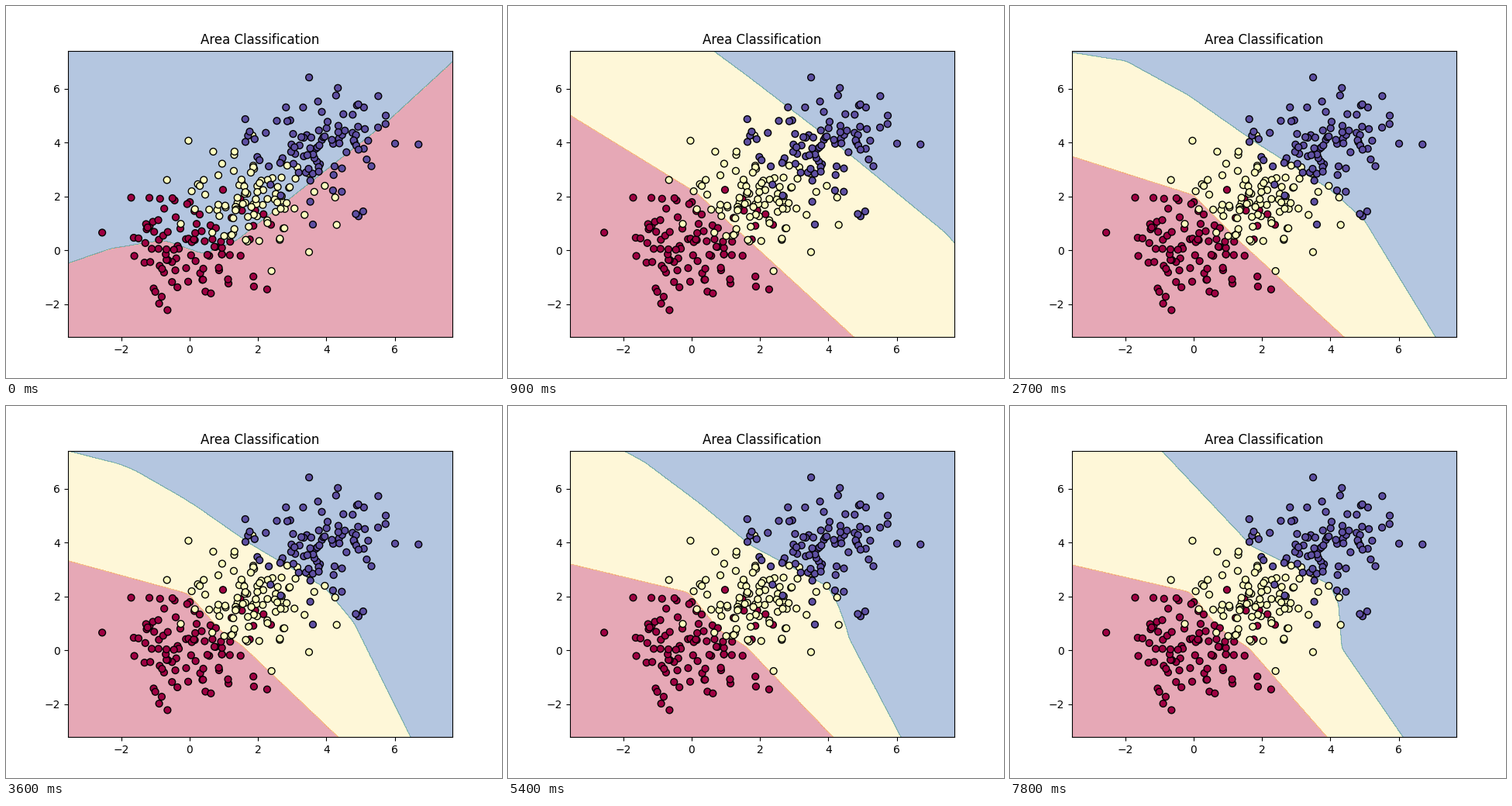
Write a matplotlib script that moves like this. It is 640 by 480 pixels and loops after 8000 ms.

```python
import numpy as np
import matplotlib.pyplot as plt
from matplotlib.animation import FuncAnimation

STEP = 0.01
TICK_MS, TICKS, TICKS_PER_EPOCH = 100, 80, 3
LEFT, RIGHT, TOP, BOTTOM = 80, 576, 57.6, 427.2
DECAY = 0.8  # share of the remaining change left after each epoch

# Three unit Gaussian clusters along the diagonal
np.random.seed(0)
labels = np.repeat([0, 1, 2], 100)
points = np.random.randn(300, 2) + 2 * labels[:, None]

(x_min, y_min), (x_max, y_max) = points.min(0) - 1, points.max(0) + 1
xs, ys = np.arange(x_min, x_max, STEP), np.arange(y_min, y_max, STEP)
stage_x, stage_y = np.meshgrid(
    np.interp(xs, (xs[0], xs[-1]), (LEFT, RIGHT)),
    np.interp(ys, (ys[0], ys[-1]), (BOTTOM, TOP)))
along, across = stage_x + stage_y, stage_x - stage_y

# Corners of the decision borders in stage pixels: (lower, upper) per key epoch
UNTRAINED = [(80, 332), (135, 313), (203, 302), (255, 320), (297, 303), (490, 151), (576, 72)]
BORDERS = {
    1: ([(80, 87), (491, 427)],
        [(429, 58), (576, 181)]),
    5: ([(80, 169), (237, 248), (420, 427)],
        [(148, 58), (265, 138), (400, 236), (520, 333), (576, 402)]),
    9: ([(80, 194), (237, 244), (290, 298), (431, 427)],
        [(80, 60), (150, 71), (230, 115), (320, 178), (412, 236), (457, 276), (549, 427)]),
    16: ([(80, 203), (234, 241), (275, 291), (305, 308), (427, 427)],
         [(85, 58), (165, 84), (245, 131), (314, 179), (412, 234), (443, 279), (507, 427)]),
    26: ([(80, 205), (232, 240), (270, 287), (308, 312), (409, 427)],
         [(196, 58), (312, 181), (412, 230), (424, 255), (428, 312), (507, 427)]),
}
KEYS = list(BORDERS)
SAMPLES = np.arange(0, 1150, 2)
KERNEL = np.hanning(15) / np.hanning(15).sum()


def smooth_curve(corners):
    """Line through the corners, extended at both ends and slightly rounded."""
    p = np.array(corners, float)
    p = np.vstack([p[0] + 9 * (p[0] - p[1]), p, p[-1] + 9 * (p[-1] - p[-2])])
    return np.convolve(np.interp(SAMPLES, *p.T), KERNEL, mode="same")


def falling_curve(corners):
    """The same curve seen along the diagonal, so that it may get vertical."""
    return smooth_curve([(x + y, x - y) for x, y in corners])


def classify(epoch):
    if epoch == 0:
        return 2 * (stage_y < np.interp(stage_x, SAMPLES, smooth_curve(UNTRAINED)))
    start = max(k for k in KEYS[:-1] if k <= epoch)
    end = KEYS[KEYS.index(start) + 1]
    mix = (1 - DECAY ** (epoch - start)) / (1 - DECAY ** (end - start))
    area = np.zeros(across.shape, int)
    for old, new in zip(BORDERS[start], BORDERS[end]):
        curve = (1 - mix) * falling_curve(old) + mix * falling_curve(new)
        area += across > np.interp(along, SAMPLES, curve)
    return area


fig, ax = plt.subplots(figsize=(6.4, 4.8), dpi=100)
ax.scatter(*points.T, c=labels, s=40, cmap="Spectral", edgecolors="black",
           linewidths=1, zorder=2)
ax.set(title="Area Classification", xlim=(xs[0], xs[-1]), ylim=(ys[0], ys[-1]))
shown = {"epoch": None, "areas": None}


def update(tick):
    epoch = tick // TICKS_PER_EPOCH
    if epoch != shown["epoch"]:
        if shown["areas"] is not None:
            shown["areas"].remove()
        shown["areas"] = ax.contourf(xs, ys, classify(epoch), levels=np.linspace(0, 2, 9),
                                     cmap="Spectral", alpha=0.4, zorder=1)
        shown["epoch"] = epoch
    return [shown["areas"]]


anim = FuncAnimation(fig, update, frames=TICKS, interval=TICK_MS, repeat=True,
                     repeat_delay=0, init_func=lambda: update(0))
plt.show()
```
